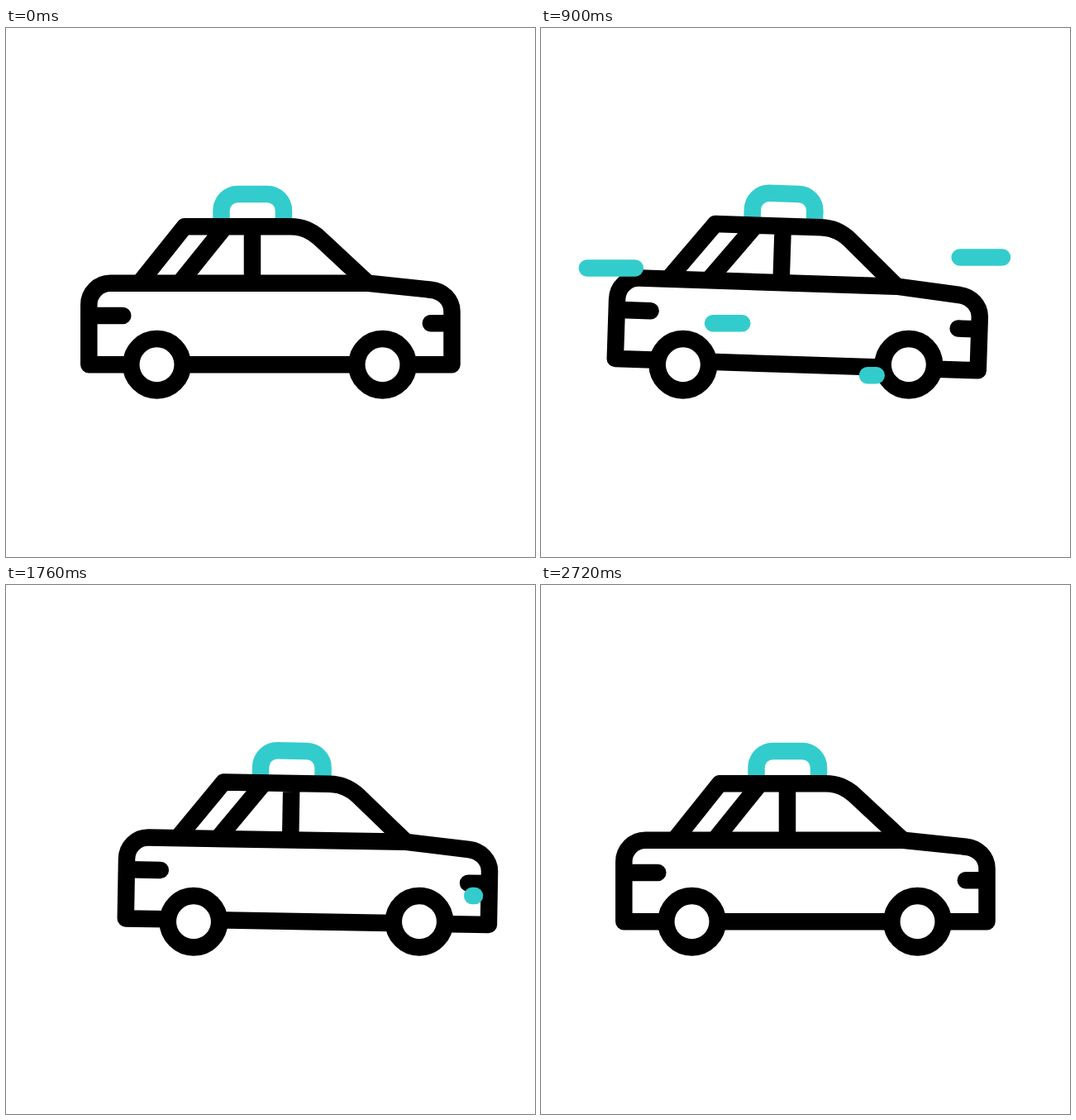
These frames come from a looping animation (640x640 px, 2.8 s). An HTML page:

```html
<!DOCTYPE html>
<html lang="en">
<head>
<meta charset="utf-8">
<title>Rocking taxi</title>
<style>
html, body { margin: 0; height: 100%; overflow: hidden; background: #fff; }
svg { display: block; width: 100vw; height: 100vh; fill: none; stroke: #000; stroke-width: 20.5; stroke-linejoin: round; }
.accent { stroke: #3cc; }
.round { stroke-linecap: round; }
</style>
</head>
<body>
<svg viewBox="0 0 640 640">
  <g id="car">
    <g id="body">
      <path class="accent" d="M260.5 236V221a20 20 0 0 1 20-20H316a20 20 0 0 1 20 20V236"/>
      <path d="M162 308L216 240.3H344Q364 240.3 379 254L437 308M265 240.3L210.5 308M298 240V309"/>
      <path d="M320 407.2H100.3V335A26 26 0 0 1 126.3 308.8H438L514 316.7C528 318 539.5 329 539.5 343V407.2H320Z"/>
      <path class="round" d="M105 348H141.3M535 357.3H513.8"/>
    </g>
    <g fill="#fff">
      <circle cx="182.5" cy="407.3" r="31.2"/>
      <circle cx="455.5" cy="407.3" r="31.2"/>
    </g>
  </g>
  <g id="dashes" class="accent round"></g>
</svg>
<script>
const LOOP = 2800, START = 200, END = 2700;
const TRAVEL = 500, LAG = 200, SHORT = 105, LONG = 146;
const $ = id => document.getElementById(id);
const clamp = u => Math.min(1, Math.max(0, u));
const ease = u => u * u * (3 - 2 * u);

// The car backs up, surges forward, then drifts home
const drive = [[START, 0], [400, -10.5], [700, -22], [1500, 50], [1760, 44.5], [2300, 25.5], [END, 0]];

// Smooth curve through the keys, flat at turning points and at both ends
function slope(i) {
  const p = drive[i - 1], k = drive[i], n = drive[i + 1];
  return p && n && (k[1] - p[1]) * (n[1] - k[1]) > 0 ? (n[1] - p[1]) / (n[0] - p[0]) : 0;
}

function shift(t) {
  const i = drive.findIndex(k => k[0] > t);
  if (i < 1) return 0;
  const [t0, a] = drive[i - 1], [t1, b] = drive[i];
  const d = t1 - t0, s = (t - t0) / d;
  return a + (b - a) * ease(s) + d * s * (1 - s) * (slope(i - 1) * (1 - s) - slope(i) * s);
}

// Steady rocking that fades in and out
function tilt(t) {
  const fade = ease(clamp(Math.min(t - START, END - t) / 250));
  return -2.1 * fade * Math.cos(Math.PI * (t - 500) / 475);
}

// A streak's head runs left from x; its tail follows after LAG
const streaks = [];
function streak(length, start, x, y) {
  const line = document.createElementNS('http://www.w3.org/2000/svg', 'line');
  line.setAttribute('y1', y);
  line.setAttribute('y2', y);
  $('dashes').append(line);
  streaks.push(t => {
    const age = t - start;
    const at = u => x - length * ease(clamp(u / TRAVEL));
    line.setAttribute('x1', at(age));
    line.setAttribute('x2', at(age - LAG));
    line.style.display = age > 0 && age < TRAVEL + LAG ? '' : 'none';
  });
}

streak(LONG, START, 504, 210.3);
streak(SHORT, 300, 500, 420.3);
streak(LONG, 361, 354, 357.3);
streak(SHORT, 510, 148, 290.5);
streak(SHORT, 642, 562, 277.5);
streak(SHORT, 1712, 567, 376);
streak(SHORT, 1828, 187, 210.3);
streak(SHORT, 1880, 181, 388.7);
streak(LONG, 2000, 356, 283.3);

function tick() {
  const t = performance.now() % LOOP;
  $('car').setAttribute('transform', `translate(${shift(t)})`);
  $('body').setAttribute('transform', `rotate(${tilt(t)} 319.8 407)`);
  streaks.forEach(move => move(t));
  requestAnimationFrame(tick);
}
tick();
</script>
</body>
</html>
```
